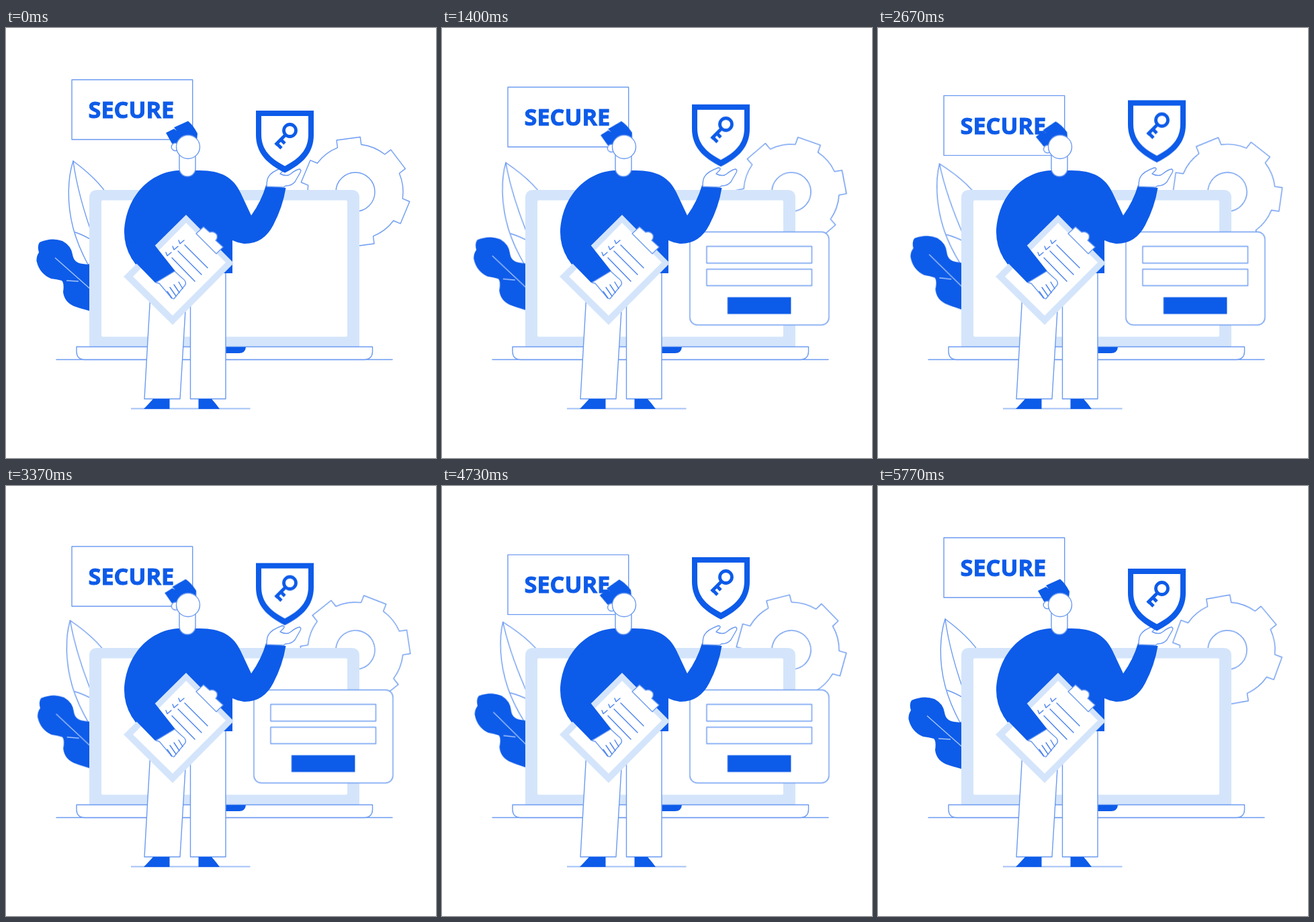
These frames come from a looping animation (640 by 640 pixels, 5810 ms). An HTML page:

```html
<!DOCTYPE html>
<html lang="en">
<head>
<meta charset="utf-8">
<title>Secure</title>
<style>
  html, body { margin: 0; width: 100%; height: 100%; overflow: hidden; background: #fff; }
  svg { display: block; width: 100vw; height: 100vh; }

  :root {
    --blue: #0d5be9;
    --thin: #6b9af1;
    --pale: #d4e5fb;
    --loop: 5810ms;
    --sine: cubic-bezier(.364, 0, .636, 1);
  }
  .line { fill: #fff; stroke: var(--thin); stroke-width: 1.4; stroke-linejoin: round; stroke-linecap: round; }
  .ink { fill: none; stroke: #4a82ee; stroke-width: 1.4; stroke-linecap: round; stroke-linejoin: round; }
  .open { fill: none; }
  .blue { fill: var(--blue); }
  .pale { fill: var(--pale); }
  .white { fill: #fff; }
  text { font: bold 34.3px "Noto Sans", "Open Sans", sans-serif; fill: var(--blue); stroke: var(--blue); stroke-width: .9; }

  /* three swings there and back per loop */
  .swing { animation: swing calc(var(--loop) / 6) var(--sine) -30ms infinite alternate; }
  @keyframes swing { from { transform: none; } to { transform: var(--to); } }
  .shield { --to: translateY(-17.3px); }
  .bush { --to: rotate(3.3deg); transform-origin: 170px 400px; }
  .leaf { --to: rotate(-4.6deg); transform-origin: 153px 318px; }
  .hair { --to: rotate(-11deg); transform-origin: 271px 177px; }

  .gear { transform-origin: 520px 244px; animation: spin var(--loop) linear infinite; }
  @keyframes spin { to { transform: rotate(360deg); } }

  .sign { animation: sign var(--loop) var(--sine) infinite; }
  @keyframes sign {
    0%, 31%, 65.3%, 98.4%, 100% { transform: translateY(0); }
    16%, 49%, 51%, 80.8%, 82.5% { transform: translateY(25.4px); }
  }

  .card { animation: card var(--loop) var(--sine) infinite; }
  @keyframes card {
    0%, 16.2%, 90.4%, 100% { transform: translate(472.4px, 480px) scale(0); }
    23.7%, 82.7% { transform: translate(472.4px, 372.5px) scale(1); }
  }
</style>
</head>
<body>
<svg viewBox="0 0 640 640">
  <g class="sign">
    <rect class="line" x="98" y="77" width="179.7" height="89"/>
    <text x="122.5" y="134">SECURE</text>
  </g>

  <g class="gear">
    <path class="line" id="teeth"/>
    <circle class="line" cx="520" cy="244" r="29"/>
  </g>

  <g class="swing leaf">
    <path class="line" d="M100 198C92 222 90 260 100 298Q107 324 122 352L160 340L158 262Q146 232 100 198Z"/>
    <path class="line open" d="M100 198Q107 250 132 318M103 304Q115 308 130 317"/>
  </g>
  <g class="swing bush">
    <path class="blue" d="M50 319Q68 311 84 317Q97 324 99 337Q101 350 114 351L140 354V425Q112 418 101 414Q87 408 85 393Q87 380 83 376Q76 374 67 373Q50 366 45.500 347Q45 340 49 334Q46 324 50 319Z"/>
    <path d="M73 342L134 396M90 376L108 377" fill="none" stroke="#a9c7f8" stroke-width="1.4"/>
  </g>

  <g>
    <path class="line" d="M75 493.500H575"/>
    <path class="pale" d="M124 474V253Q124 241 136 241H514Q526 241 526 253V474Z"/>
    <rect class="white" x="142" y="256.500" width="366" height="203" rx="2"/>
    <path class="line" d="M105 474.500H545.500V482Q545 493 534 493.500H116Q105.500 493 105 482Z"/>
    <path class="blue" d="M293 475H357Q356 484 347 484H303Q294 484 293 475Z"/>
  </g>

  <g class="card">
    <rect class="line" x="-103.500" y="-69" width="207" height="138.500" rx="11"/>
    <rect class="line" x="-78.500" y="-47.500" width="156.500" height="25"/>
    <rect class="line" x="-78.500" y="-13.500" width="156.500" height="24.500"/>
    <rect class="blue" x="-47.500" y="28.200" width="94.500" height="25"/>
  </g>

  <!-- legs and shoes -->
  <path d="M186 566.500H363.500" stroke="#a3c2f7" stroke-width="2"/>
  <path class="line" d="M217 360L206 552H259L267 420V360Z"/>
  <path class="line" d="M274.500 350V552H327V350Z"/>
  <path class="blue" d="M205 567Q211 561 219 552H243.500V567ZM286.500 567V552H306Q313 560 318 567Z"/>

  <!-- sweater -->
  <path class="blue" d="M257 212H283C320 211 338 222 349 245L365 279Q380 258 387 234L416.500 238Q412 266 398 293Q383 322 354 321Q345 320 337 316V365H250L222 379Q198 362 187 343Q176 325 176 304C178 250 215 214 257 212Z"/>
  <path class="line" d="M258 186V209A12 12 0 0 0 282 209V186Z"/>

  <!-- head -->
  <g class="swing hair">
    <path class="blue" d="M238 156L250 150L254 153L250 148L271 138.500Q279 145 285 157L284 168L257 174L247 172Z"/>
    <circle class="line" cx="252" cy="177" r="5.800"/>
  </g>
  <circle class="line" cx="271" cy="177" r="17.500"/>

  <!-- clipboard -->
  <path class="pale" d="M268 278L339 350L248 442L175 370Z"/>
  <path class="white" d="M268 290L327 349L248 428L189 370Z"/>
  <path class="line" d="M283 306L294 296L303 304Q310 302 314 308Q315 314 312 316L323 326L313 336Z"/>
  <path class="ink" d="M247 342L281 377M256 332L291 367M266 323L300 357"/>
  <path class="ink" d="M238 334L240 339L246 334M248 325L250 330L256 325M257 316L259 321L265 316"/>
  <path class="blue" d="M222 324L252 362L222 379L187 343L178 318Z"/>
  <path class="line" d="M251 362L262 372Q269 377 267 382L250 403Q246 403 244 399L228 380L223 379Z"/>
  <path class="ink" d="M240 392L247 402M244 386L253 399M250 382L258 394M257 378L263 388"/>

  <!-- raised hand -->
  <path class="line" d="M388 236Q388 225 391 221Q395 214 411 208Q416 208 413 212L408 217Q418 222 424 217Q431 211 437 210Q440 211 438 215L430 229Q425 235 416 235L413 237Z"/>

  <g class="swing shield">
    <path class="blue" d="M372 123H458V159C458 186 442 202 415 215.500C388 202 372 186 372 159Z"/>
    <path class="white" d="M380 131H450V158C450 181 437 194 415 205.500C393 194 380 181 380 158Z"/>
    <g fill="none" stroke="#0d5be9" stroke-width="4.800">
      <circle cx="422.500" cy="152.500" r="9"/>
      <path d="M416 159L401 174M402 171L410 179M408 165L415 172"/>
    </g>
  </g>
</svg>
<script>
  const polar = (r, deg) => {
    const a = deg * Math.PI / 180;
    return `${(520 + r * Math.cos(a)).toFixed(2)} ${(244 + r * Math.sin(a)).toFixed(2)}`;
  };

  // six teeth joined by arcs
  const rootR = 71, tipR = 82, teeth = 6, start = 22.5, root = 14.5, tip = 12.5;
  let d = "";
  for (let i = 0; i < teeth; i++) {
    const mid = start + i * 360 / teeth;
    d += (i ? `A${rootR} ${rootR} 0 0 1 ` : "M") + polar(rootR, mid - root);
    d += `L${polar(tipR, mid - tip)}L${polar(tipR, mid + tip)}L${polar(rootR, mid + root)}`;
  }
  d += `A${rootR} ${rootR} 0 0 1 ${polar(rootR, start - root)}Z`;
  document.getElementById("teeth").setAttribute("d", d);
</script>
</body>
</html>
```
